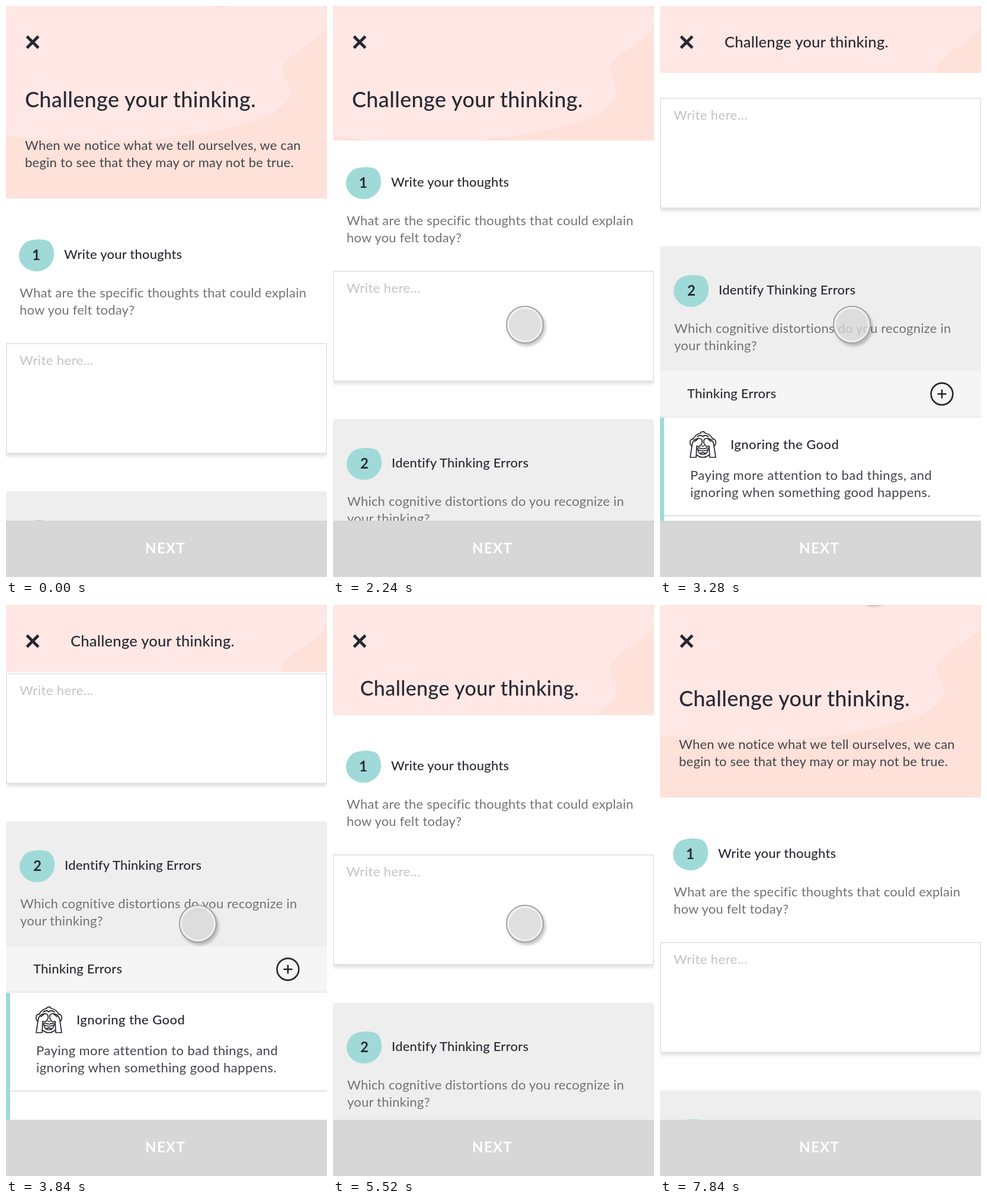
These frames come from a looping animation (542 by 964 pixels, 8080 ms). An HTML page:

```html
<!DOCTYPE html>
<html lang="en">
<head>
<meta charset="utf-8">
<title>Challenge your thinking</title>
<style>
  html, body { margin: 0; width: 100%; height: 100%; overflow: hidden; background: #fff; }
  svg { display: block; width: 542px; height: 964px; }
  text { font: 400 22px Lato, "Open Sans", sans-serif; letter-spacing: .01em; fill: #2a2b33; }
  .title { font-size: 36px; font-weight: 500; }
  .head { font-weight: 500; }
  .intro { fill: #44434a; }
  .hint { fill: #737377; }
  .ghost { fill: #c3c3c7; }
  .ghost, .card text { letter-spacing: .02em; }
  .num { font-size: 24px; font-weight: 700; letter-spacing: 0; text-anchor: middle; }
  .next { font-size: 24px; font-weight: 700; letter-spacing: 1.4px; fill: #fff; }
  .teal { fill: #a0dad8; }
  .line { fill: none; stroke: #25262d; stroke-linecap: round; stroke-linejoin: round; }
  .field { fill: #fff; stroke: #dfdfe0; stroke-width: 1.5; filter: drop-shadow(0 4px 3px rgba(0,0,0,.13)); }
  #touch { filter: drop-shadow(3px 4px 2px rgba(0,0,0,.24)); }
</style>
</head>
<body>
<svg viewBox="0 0 542 964">
  <defs>
    <clipPath id="crop"><rect id="cropBox" width="542" height="325"/></clipPath>
    <path id="blob" d="M14 4.500C25-.5 42 0 50 4C57 9 60 20 59 29C58 42 46 55 30 55C14 55 1 44 0 30C-.5 20 5 9 14 4.500Z"/>
  </defs>
  <rect width="542" height="964" fill="#fff"/>

  <g id="page">
    <use href="#blob" class="teal" x="22" y="393"/>
    <text class="num" x="51" y="429">1</text>
    <text class="head" x="98" y="427">Write your thoughts</text>
    <text class="hint" x="23" y="492">What are the specific thoughts that could explain</text>
    <text class="hint" x="23" y="521">how you felt today?</text>
    <rect class="field" x=".75" y="570" width="540.5" height="185"/>
    <text class="ghost" x="23" y="606">Write here…</text>

    <rect y="819.500" width="542" height="240" rx="4" fill="#eee"/>
    <use href="#blob" class="teal" x="23" y="867"/>
    <text class="num" x="53" y="903">2</text>
    <text class="head" x="99" y="901">Identify Thinking Errors</text>
    <text class="hint" x="24" y="966">Which cognitive distortions do you recognize in</text>
    <text class="hint" x="24" y="995">your thinking?</text>

    <rect y="1030" width="542" height="79" rx="4" fill="#f5f5f5"/>
    <rect y="1106" width="542" height="3" fill="#ededed"/>
    <text class="head" x="46" y="1076">Thinking Errors</text>
    <g class="line" stroke-width="2.6">
      <circle cx="476" cy="1069" r="18.4"/>
      <path d="M469.5 1069h13M476 1062.5v13"/>
    </g>

    <g class="card">
      <rect y="1109" width="542" height="300" fill="#fff"/>
      <rect y="1273" width="542" height="3" fill="#e9e9e9"/>
      <rect class="teal" y="1109" width="7" height="300"/>
      <g class="line" stroke-width="1.7" transform="translate(50 1132)">
        <path d="M6 13C9 7 14 4 19 3C18 2 19 1 21 1C23 0 25 1 26 3C32 4 36 7 39 13"/>
        <path d="M13 9Q19 5 22.5 9Q26 5 32 9"/>
        <path d="M6 13C0 12-1 22 4 25M39 13C45 12 46 22 41 25"/>
        <path d="M1 44L4 24C5 15 11 11 17 12C22 13 22 18 20 22C18 26 14 26 12 25L11 44Z"/>
        <path d="M44 44L41 24C40 15 34 11 28 12C23 13 23 18 25 22C27 26 31 26 33 25L34 44Z"/>
        <path d="M9 17L14 13M36 17L31 13M21 25h3"/>
        <path d="M12 31Q13 28 16 28Q22.5 31 29 28Q32 28 33 31M14 31Q22.5 35 31 31C30 42 15 42 14 31Z"/>
        <path d="M18 38Q22.5 34 27 38M12 40Q22 48 33 40"/>
      </g>
      <text class="head" x="119" y="1162">Ignoring the Good</text>
      <text class="intro" x="51" y="1214">Paying more attention to bad things, and</text>
      <text class="intro" x="51" y="1243">ignoring when something good happens.</text>
    </g>
  </g>

  <g clip-path="url(#crop)">
    <rect width="542" height="325" fill="#fee1d8"/>
    <path fill="#fee7e5" d="M0 0H535C543 12 545 26 537 42C523 64 470 82 467 107C468 125 482 130 479 148C476 166 456 179 437 187C380 210 290 225 210 228C120 231 60 228 0 219Z"/>
    <text class="intro" x="32" y="243">When we notice what we tell ourselves, we can</text>
    <text class="intro" x="32" y="272">begin to see that they may or may not be true.</text>
    <text id="title" class="title">Challenge your thinking.</text>
    <path d="M37 53L53 69M53 53L37 69" stroke="#25262d" stroke-width="4.8" stroke-linecap="square"/>
  </g>

  <rect y="869" width="542" height="95" fill="#d7d7d7"/>
  <text class="next" x="235" y="924">NEXT</text>

  <g id="touch">
    <circle r="30" fill="#e4e4e4" fill-opacity=".75"/>
    <circle r="28.5" fill="none" stroke="#f4f4f4" stroke-width="3" stroke-opacity=".8"/>
    <circle r="31" fill="none" stroke="#a2a2a2" stroke-width="2"/>
  </g>
</svg>
<script>
  const LOOP = 8080, STEP = 80;
  const HOME = [324, 538], AWAY = [358, -37];
  // [time, scroll, speed in px/ms]
  const SCROLL = [
    [1780, 0, 0], [2240, 122, .4], [3280, 414, .14], [3840, 454, 0],
    [4020, 454, 0], [4640, 396, -.22], [5520, 148, -.3], [5760, 78, -.27],
    [6560, -2, 0], [6720, 0, 0]
  ];

  const $ = id => document.getElementById(id);
  const page = $('page'), cropBox = $('cropBox'), title = $('title'), touch = $('touch');
  const mix = (a, b, p) => a + (b - a) * p;
  const part = (v, a, b) => Math.min(1, Math.max(0, (v - a) / (b - a)));
  const smooth = p => p * p * (3 - 2 * p);

  function scrollAt(t) {
    const i = SCROLL.findIndex(k => t < k[0]);
    if (i < 1) return 0;
    const [t0, y0, v0] = SCROLL[i - 1], [t1, y1, v1] = SCROLL[i];
    const d = t1 - t0, p = (t - t0) / d, q = 1 - p;
    return mix(y0, y1, smooth(p)) + d * p * q * (v0 * q - v1 * p);
  }

  // 0 is off stage, 1 is at rest
  function touchAt(t) {
    if (t < 6820) return smooth(part(t, 100, 960));
    const u = (t - 6820) * .0072;
    return (1 + u) * Math.exp(-u);
  }

  function draw(t) {
    const y = scrollAt(t);
    page.setAttribute('transform', `translate(0 ${-y})`);
    cropBox.setAttribute('height', mix(325, 113, part(y, 60, 194)));
    const k = part(y, 138, 194);
    title.setAttribute('transform',
      `translate(${mix(32, 109, k)} ${mix(171, 70, k)}) scale(${mix(1, .71, k)})`);
    const p = touchAt(t);
    touch.setAttribute('transform',
      `translate(${mix(AWAY[0], HOME[0], p)} ${mix(AWAY[1], HOME[1], p)})`);
  }

  function tick() {
    const t = performance.now() % LOOP;
    draw(Math.floor(t / STEP) * STEP);
    requestAnimationFrame(tick);
  }
  tick();
</script>
</body>
</html>
```
